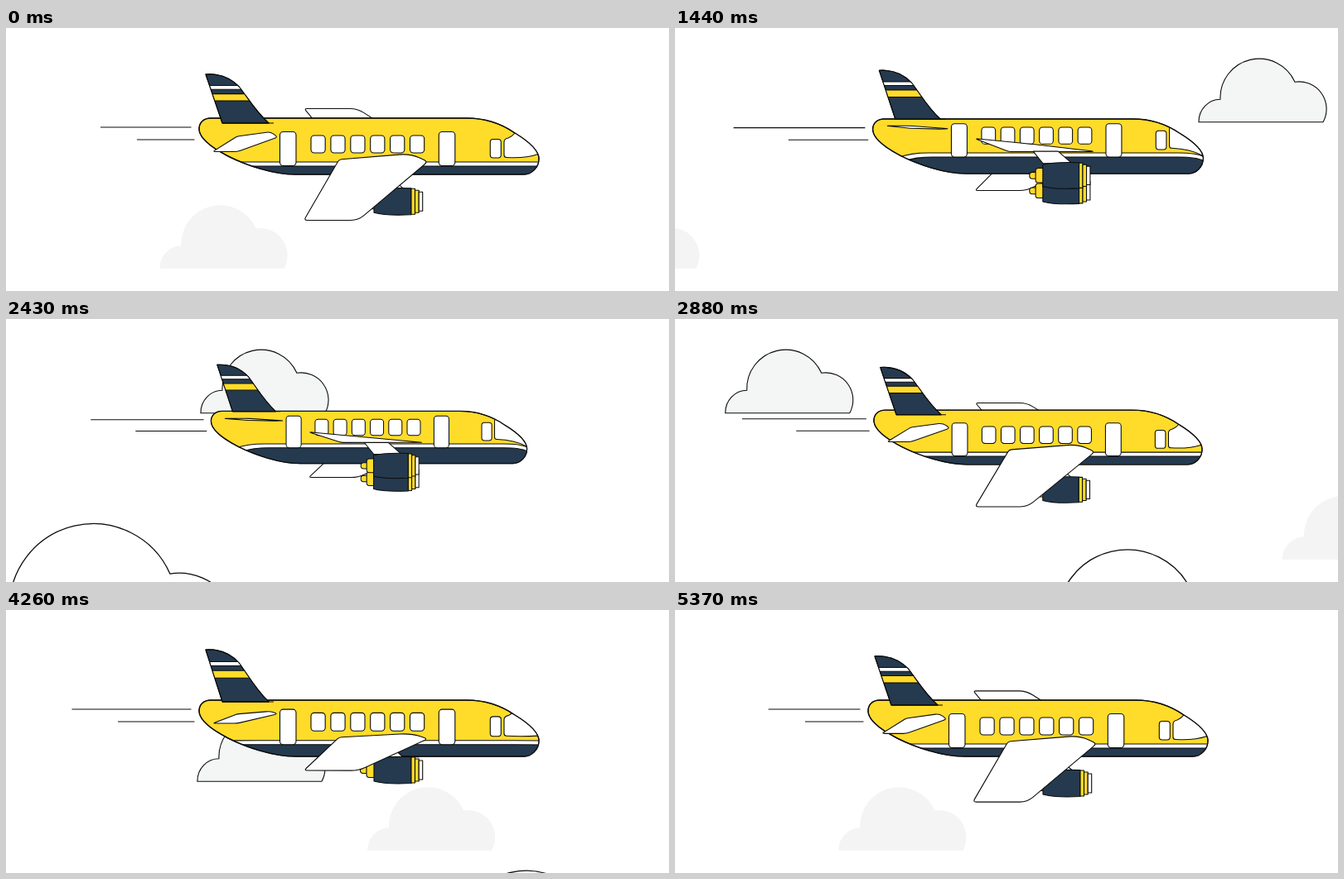
An HTML page that plays this animation: 800x318 px, repeating every 5400 ms.

```html
<!DOCTYPE html>
<html lang="en">
<head>
<meta charset="utf-8">
<title>Plane in flight</title>
<style>
  html, body { margin: 0; width: 100%; height: 100%; overflow: hidden; background: #fff; }
  svg { display: block; width: 100%; height: 100%; }
</style>
</head>
<body>
<svg id="stage" viewBox="0 0 800 318"></svg>
<script>
const LOOP = 5400, STEP = 30;
const NAVY = '#253a4f', YELLOW = '#ffdb2a', WHITE = '#fff', INK = '#0b0b0b';
const stage = document.getElementById('stage');

// Smooth curve through [time, value] keys that never overshoots them.
function track(keys) {
  const slope = keys.slice(1).map((k, i) => (k[1] - keys[i][1]) / (k[0] - keys[i][0]));
  const tangent = keys.map((_, i) => {
    const a = slope[i - 1] ?? slope[i], b = slope[i] ?? a;
    return a * b <= 0 ? 0 : 2 * a * b / (a + b);
  });
  return t => {
    let i = keys.findIndex(k => k[0] > t) - 1;
    if (i < 0) return keys[keys.length - 1][1];
    const [t0, v0] = keys[i], [t1, v1] = keys[i + 1], d = t1 - t0, u = (t - t0) / d;
    const s = u * u * (3 - 2 * u);
    return v0 + (v1 - v0) * s + d * u * (1 - u) * (tangent[i] * (1 - u) - tangent[i + 1] * u);
  };
}

// Roll is the height of the near wing tip relative to the plane's centre.
const rollAt = track([[0, 89], [450, 28], [780, 52.5], [1030, 66], [1710, -57], [2010, -64],
  [2130, -65], [2850, 88], [2880, 86.4], [3450, -22], [3580, -28], [4180, 52], [4260, 50.5],
  [4600, 17], [5130, 70], [5370, 88.6], [5400, 89]]);
const scaleAt = track([[0, 1], [950, 1], [2010, 0.925], [2150, 0.92], [2880, 0.966],
  [3450, 1.03], [3700, 1.055], [4230, 1], [5400, 1]]);
const longTrail = track([[0, 114], [480, 92], [780, 98], [1200, 52], [1710, 75], [2010, 84.5],
  [2880, 68.4], [3450, 76.8], [4020, 67], [4260, 79.5], [5370, 112.7], [5400, 114]]);
const shortTrail = track([[0, 158], [480, 146], [780, 150.5], [1200, 127], [2010, 134],
  [2880, 136], [3450, 139], [4020, 130], [4260, 135], [5370, 157], [5400, 158]]);

const ROLL_STOPS = [89, 52.5, -22, -64];

// Returns a function that blends four heights, one for each roll stop.
function blender(roll) {
  let i = 0;
  while (i < 2 && roll < ROLL_STOPS[i + 1]) i++;
  const u = (ROLL_STOPS[i] - roll) / (ROLL_STOPS[i] - ROLL_STOPS[i + 1]);
  return (...v) => v[i] + (v[i + 1] - v[i]) * u;
}

const path = (d, fill, extra = '') => `<path d="${d}" fill="${fill}" ${extra}/>`;
const rect = (x, y, w, h, fill, r = 0) =>
  `<rect x="${x}" y="${y}" width="${w}" height="${h}" rx="${r}" fill="${fill}"/>`;
const line = (x1, x2, y) => `<path d="M${x1} ${y}H${x2}"/>`;

// Polygon from [x, y, corner radius] points.
function polygon(points, fill) {
  const n = points.length;
  const toward = ([x, y, r], [px, py]) => {
    const u = Math.min(0.5, r / (Math.hypot(px - x, py - y) || 1));
    return `${x + (px - x) * u} ${y + (py - y) * u}`;
  };
  const d = points.map((p, i) =>
    `${i ? 'L' : 'M'}${toward(p, points[(i + n - 1) % n])}Q${p[0]} ${p[1]} ${toward(p, points[(i + 1) % n])}`);
  return path(d.join('') + 'Z', fill);
}

const CLOUD = 'M0 75.5A26 27 0 0 1 26 48A47 47 0 0 1 116 27A33 33 0 0 1 150 75.5Z';
const cloud = (x, y, scale, fill, width) =>
  `<path transform="translate(${x} ${y}) scale(${scale})" d="${CLOUD}" fill="${fill}"
    stroke="${width ? INK : 'none'}" stroke-width="${width / scale}"/>`;

function drift(t, start, length) {
  const u = Math.max(0, Math.min(1, (t - start) / length));
  return 922 - 1144 * u * u * (3 - 2 * u);
}

function backClouds(t) {
  return cloud(185.5 - 0.2154 * t, 215.3, 1, '#f4f4f4', 0)
    + cloud(733 - 0.2151 * (t - 2880), 215.3, 1, '#f4f4f4', 0)
    + cloud(drift(t, 74, 4152), 38.3, 1, '#f3f6f5', 1.1)
    + cloud(drift(t, 2314, 3415), 131.8, 1, '#f3f6f5', 1.1);
}

// Each entry: time, position of the crown, scale.
const NEAR_CLOUDS = [[780, 344, 281, 1.8], [2010, 622, 250, 2.15],
  [2880, 546, 281, 1.8], [4260, 628, 317.3, 1.8]];
const frontClouds = t => NEAR_CLOUDS.map(([at, x, y, s]) =>
  cloud(x - 73 * s - 1.23 * (t - at), y, s, WHITE, 1.3)).join('');

function engine(c) {
  return polygon([[432, c - 30, 0], [463, c - 30, 0], [480, c - 15, 0], [444, c - 15, 0]], WHITE)
    + rect(427.5, c - 4, 12, 8, YELLOW, 3.5)
    + rect(435, c - 9, 14, 18, YELLOW, 3.5)
    + path(`M444 ${c - 13.5}C455 ${c - 16.5} 470 ${c - 16.5} 489 ${c - 16}V${c + 16}`
      + `C470 ${c + 17} 455 ${c + 16.5} 444 ${c + 13.5}Z`, NAVY)
    + rect(489, c - 15.5, 4.5, 31, YELLOW)
    + rect(493.5, c - 13.5, 4.7, 27, YELLOW)
    + rect(498.2, c - 11.5, 4.5, 23, WHITE);
}

function fin(top, base) {
  const y = k => top + k * (base - top);
  const shape = `M241 ${y(0)}C260 ${y(-0.02)} 273 ${y(0.11)} 281 ${y(0.25)}`
    + `C291 ${y(0.46)} 301 ${y(0.76)} 317 ${y(1)}H261Z`;
  const band = (a, b, fill) => rect(230, y(a), 100, y(b) - y(a), fill);
  return `<clipPath id="fin"><path d="${shape}"/></clipPath>`
    + path(shape, NAVY)
    + `<g clip-path="url(#fin)">${band(0.23, 0.31, WHITE)}${band(0.4, 0.545, YELLOW)}</g>`
    + path(shape, 'none') + line(261, 323, base);
}

const HULL = 'M247 109H556C585 109 604 120 614 127C632 138 643 149 643 158C643 169 634 177 625 177'
  + 'H349C322 177 290 166 268 155C245 143 233 132 233 122C233 114 239 109 247 109Z';

function belly(y, bend, inset, fill) {
  return path(`M${264 + inset} ${y + bend}C${277 + inset} ${y + bend * 0.2} ${286 + inset} ${y} ${302 + inset} ${y}`
    + `H612C628 ${y} 640 ${y + bend * 0.3} 645 ${y + bend}V185H${264 + inset}Z`, fill);
}

function hull(mix) {
  const stripe = mix(162, 158, 150, 146.2), bend = mix(0, 0, 7, 10);
  const sill = mix(156.5, 152.5, 144, 138), brow = mix(138, 133, 120, 119);
  const glass = `M601 ${brow}Q601 ${brow - 4} 606 ${brow - 5}Q611 ${brow - 7} 615 ${brow - 12}`
    + `L650 100V153L642 ${mix(152.5, 152, 155, 153)}Q${mix(626, 622, 628, 624)} ${sill + mix(1.5, 1, 1, 3)} 604 ${sill}`
    + `Q601 ${sill} 601 ${sill - 3}Z`;
  return path(HULL, YELLOW)
    + `<g clip-path="url(#hull)">${belly(stripe, bend, 0, WHITE)}${belly(stripe + 5, bend, 6, NAVY)}`
    + path(glass, WHITE) + '</g>'
    + path(HULL, 'none', 'stroke-width="1.4"');
}

function openings(mix) {
  const doorTop = mix(125.5, 120.3, 114, 112.2), doorHeight = mix(166.5, 163, 155, 151.5) - doorTop;
  const paneTop = mix(130, 124.5, 118.3, 116), paneHeight = mix(151, 146.5, 139, 136) - paneTop;
  const sideTop = mix(134.5, 129, 122.6, 120.3);
  let out = '';
  for (const x of [330.5, 522.3]) out += rect(x, doorTop, 19.5, doorHeight, WHITE, 4);
  for (let i = 0; i < 6; i++) out += rect(368 + 23.9 * i, paneTop, 17.2, paneHeight, WHITE, 4);
  return out + rect(584.3, sideTop, 13, mix(157, 153, 146, 142) - sideTop, WHITE, 3.5);
}

function plane(roll) {
  const mix = blender(roll);
  const farTip = mix(97.5, 134, 210, 237.6);
  const farTail = mix(114, 128, 138, 155.5);
  const nearTail = mix(149.5, 137.7, 113.7, 101.3);
  const tip = 143.5 + roll;

  const farWing = polygon([[360, farTip, 3], [424, farTip, 9],
    [506, mix(150, 150, 158, 168), 0], [402, mix(149, 149, 157, 164), 0]], WHITE);
  const farStabilizer = polygon([[250, farTail, 3], [277, farTail, 3], [320, 135, 0], [279, 135, 0]], WHITE);
  const stabilizer = polygon([[249.5, nearTail, 3], [279, nearTail, 4],
    [328, mix(132, 125.8, 120.3, 117), 4], [319, mix(125.5, 122.5, 121.5, 121), 5],
    [279, mix(131, 126, 119.5, 118), 2]], WHITE);
  const wing = polygon([[359.5, tip, 4], [425, mix(232.5, 196, 129, 79.7), 9],
    [509, mix(161.5, 156, 148.3, 145.5), 5], [mix(488, 489, 500, 501), mix(152, 149.3, 149.7, 151), 14],
    [402, mix(159, 154, 148.8, 147.5), 3]], WHITE);
  const nearEngine = engine(mix(209.7, 194, 176.5, 170));

  return farWing + farStabilizer + engine(mix(155, 163, 205, 219.7))
    + hull(mix) + fin(mix(56, 48, 48.8, 54.3), mix(115, 111, 109, 109.4))
    + openings(mix) + stabilizer
    + (roll > 15 ? nearEngine + wing : wing + nearEngine);
}

function draw(t) {
  const s = scaleAt(t);
  stage.innerHTML = `<clipPath id="hull"><path d="${HULL}"/></clipPath>${backClouds(t)}
    <g transform="translate(438 143.5) scale(${s}) translate(-438 -143.5)"
      stroke="${INK}" stroke-width="1.1" stroke-linejoin="round">
      ${line(longTrail(t), 223.5, 120)}${line(shortTrail(t), 227.5, 135)}${plane(rollAt(t))}
    </g>${frontClouds(t)}`;
}

function tick() {
  const t = performance.now() % LOOP;
  draw(t - t % STEP);
  requestAnimationFrame(tick);
}
tick();
</script>
</body>
</html>
```
